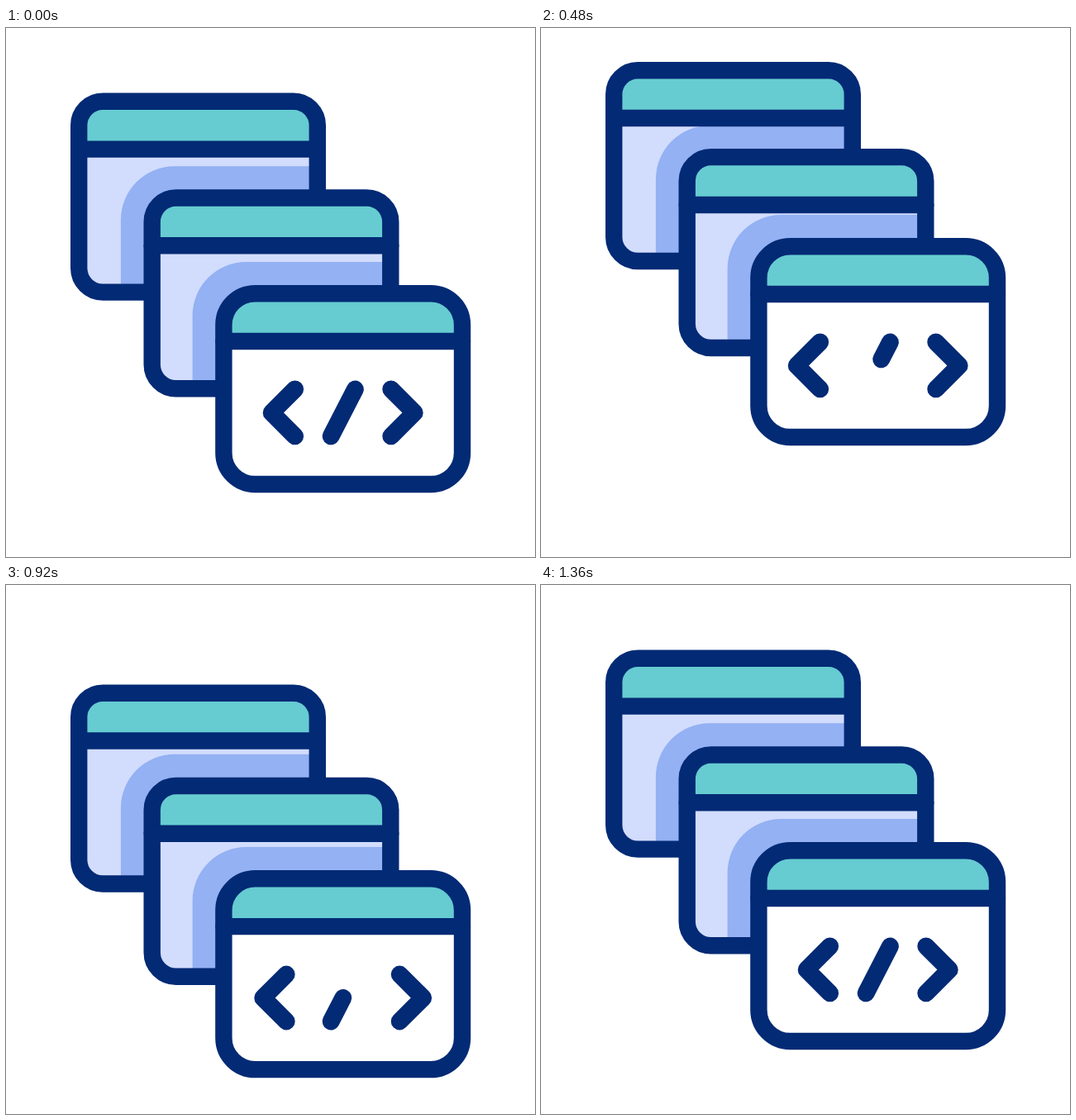
Recreate the animation shown at these times as an HTML page with a canvas. Size 640x640 px, loop 1.4 s.

```html
<!DOCTYPE html>
<html lang="en">
<head>
<meta charset="utf-8">
<title>Code windows</title>
<style>
  html, body { margin: 0; height: 100%; overflow: hidden; background: #fff; }
  canvas { display: block; width: 100vw; height: 100vh; }
</style>
</head>
<body>
<canvas id="stage" width="640" height="640"></canvas>
<script>
const ctx = document.getElementById('stage').getContext('2d');
const LOOP = 1400, STEP = 40;
const NAVY = '#032a75', TEAL = '#66ccd1', LIGHT = '#d2dcfd', SHADE = '#93b1f3';
const WIDTH = 288.6, HEIGHT = 230.8, BAR = 57.8;

// Centre-line corner of each window, corner radius, and [time, offset] keys.
const windows = [
  { x: 88.2, y: 88.8, r: 29, fill: LIGHT, keys: [[205, 0], [512, -38], [930, 42], [1360, 0]] },
  { x: 176.7, y: 205.5, r: 29, fill: LIGHT, keys: [[98, 0], [450, -50], [812, 39.8], [1310, 0]] },
  { x: 263.4, y: 321.2, r: 38, fill: '#fff', keys: [[0, 0], [398, -64.8], [742, 43.5], [1227, 0]] }
];
const spread = [[50, 0], [670, 13.8], [1320, 0]];
const slashStart = [[380, 0], [560, 1]];
const slashEnd = [[820, 0], [1020, 1]];

// Cubic bezier (.6, 0, .4, 1), solved by bisection.
function ease(u) {
  let lo = 0, hi = 1, s = .5;
  for (let i = 0; i < 24; i++) {
    s = (lo + hi) / 2;
    const x = 1.8 * s * (1 - s) ** 2 + 1.2 * s * s * (1 - s) + s ** 3;
    if (x < u) lo = s; else hi = s;
  }
  return s * s * (3 - 2 * s);
}

function valueAt(keys, t) {
  if (t <= keys[0][0]) return keys[0][1];
  for (let i = 1; i < keys.length; i++) {
    const [t0, a] = keys[i - 1], [t1, b] = keys[i];
    if (t < t1) return a + (b - a) * ease((t - t0) / (t1 - t0));
  }
  return keys[keys.length - 1][1];
}

function line(...points) {
  ctx.beginPath();
  points.forEach(([x, y]) => ctx.lineTo(x, y));
  ctx.stroke();
}

function drawWindow({ x, y, r, fill }, dy, shadow) {
  const top = y + dy;
  const frame = new Path2D();
  frame.roundRect(x, top, WIDTH, HEIGHT, r);
  ctx.save();
  ctx.clip(frame);
  ctx.fillStyle = fill;
  ctx.fillRect(x, top, WIDTH, HEIGHT);
  if (shadow) {
    ctx.fillStyle = SHADE;
    ctx.beginPath();
    ctx.roundRect(shadow.x, shadow.y, 400, 400, 65);
    ctx.fill();
  }
  ctx.fillStyle = TEAL;
  ctx.fillRect(x, top, WIDTH, BAR);
  ctx.restore();
  ctx.lineWidth = 20.4;
  ctx.stroke(frame);
  line([x, top + BAR], [x + WIDTH, top + BAR]);
}

function drawCode(t, dy) {
  const open = valueAt(spread, t);
  const top = 437 + dy, mid = 465.4 + dy, bottom = 493.8 + dy;
  ctx.lineWidth = 21;
  line([349.6 - open, top], [321.2 - open, mid], [349.6 - open, bottom]);
  line([465.8 + open, top], [494.2 + open, mid], [465.8 + open, bottom]);

  const erasing = t < 690;
  const from = erasing ? valueAt(slashStart, t) : 0;
  const to = erasing ? 1 : valueAt(slashEnd, t);
  if (to - from < .001) return;
  const point = k => [393.2 + 29.2 * k, bottom + (top - bottom) * k];
  line(point(from), point(to));
}

function draw(t) {
  ctx.fillStyle = '#fff';
  ctx.fillRect(0, 0, 640, 640);
  ctx.strokeStyle = NAVY;
  ctx.lineCap = ctx.lineJoin = 'round';
  const offsets = windows.map(w => valueAt(w.keys, t));
  windows.forEach((w, i) => {
    const next = windows[i + 1];
    const shadow = next && { x: next.x - 37.8, y: next.y + offsets[i + 1] - 38.2 };
    drawWindow(w, offsets[i], shadow);
  });
  drawCode(t, offsets[2]);
}

function tick() {
  draw(Math.floor(performance.now() % LOOP / STEP) * STEP);
  requestAnimationFrame(tick);
}
tick();
</script>
</body>
</html>
```
